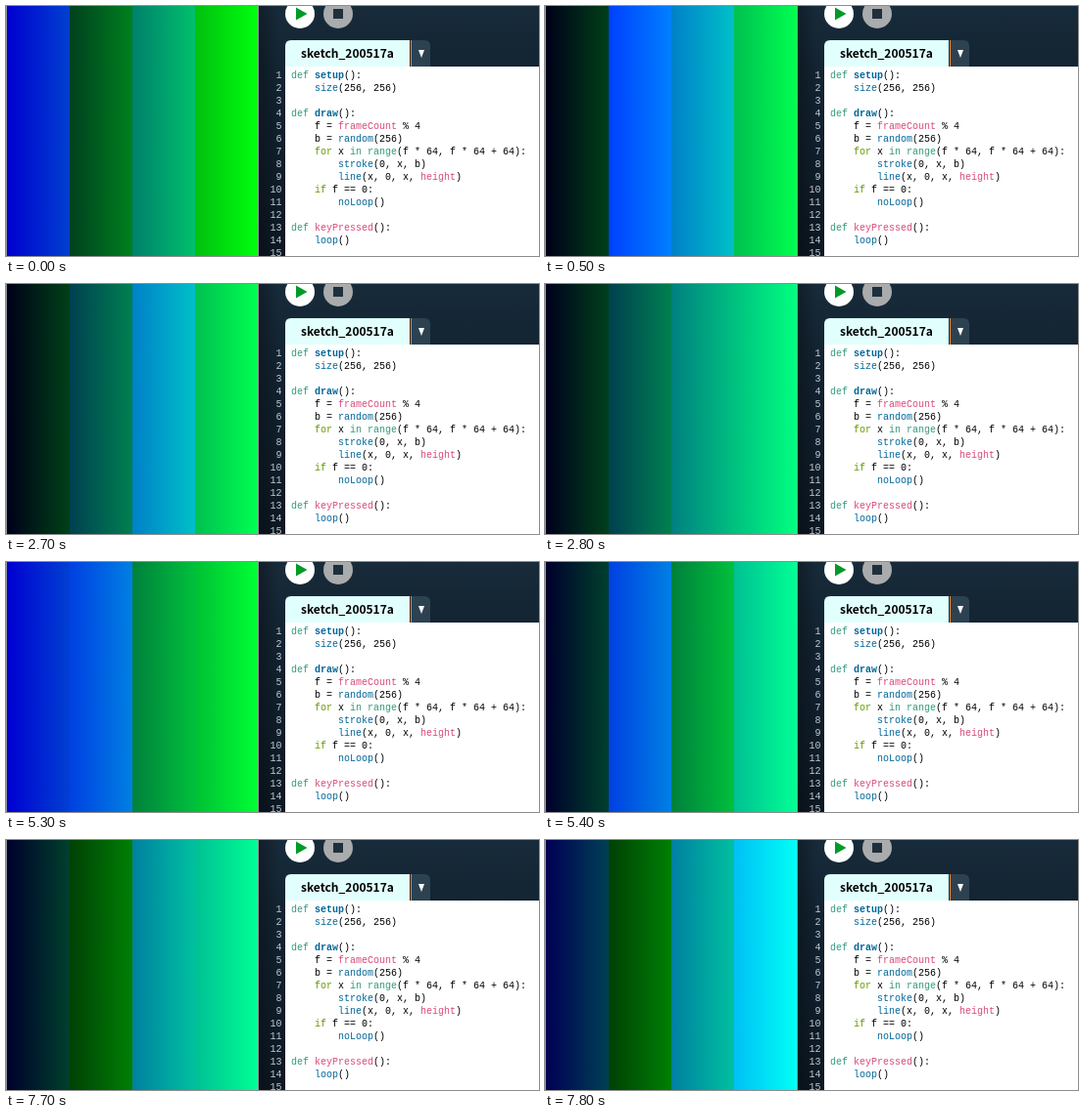
These frames come from a looping animation (544 px wide and 256 px high, 8 s). An HTML page:

```html
<!DOCTYPE html>
<html lang="en">
<head>
<meta charset="utf-8">
<title>Gradient bands sketch</title>
<style>
  html, body { margin: 0; width: 100%; height: 100%; overflow: hidden; background: #132330; }
  #stage { position: relative; width: 544px; height: 256px; overflow: hidden; background: #8c9499; }
  #stage > * { position: absolute; }
  .band { top: 0; width: 64px; height: 256px; }
  #ide { left: 0; top: 0; }
  pre {
    top: 65px; margin: 0;
    font: 10px/13px "Liberation Mono", monospace;
    color: #000;
  }
  #code { left: 291px; }
  #gutter { left: 262px; width: 19.5px; text-align: right; color: #c0cad0; }
  b, i, u, s { font-style: normal; font-weight: normal; text-decoration: none; }
  b, i { color: #006699; }
  b { font-weight: bold; }
  u { color: #33997e; }
  s { color: #d94a7a; }
  em { font-style: normal; color: #669900; }
</style>
</head>
<body>
<div id="stage">
  <svg id="ide" width="544" height="256">
    <defs>
      <linearGradient id="panel" x1="0" y1="0" x2="0" y2="1">
        <stop offset="0" stop-color="#182b3a"/>
        <stop offset=".25" stop-color="#132432"/>
        <stop offset="1" stop-color="#0c1823"/>
      </linearGradient>
      <linearGradient id="shade">
        <stop offset="0" stop-color="#000" stop-opacity=".3"/>
        <stop offset="1" stop-color="#000" stop-opacity="0"/>
      </linearGradient>
    </defs>
    <rect x="258" width="286" height="256" fill="url(#panel)"/>
    <rect x="258" width="20" height="256" fill="url(#shade)"/>
    <circle cx="300" cy="8" r="15" fill="#fff"/>
    <path d="M296 1.5l11.5 6.5-11.5 6.5z" fill="#009a28"/>
    <circle cx="339" cy="8" r="15" fill="#a9abac"/>
    <rect x="334" y="3" width="10" height="10" fill="#1f303d"/>
    <path d="M285 62V41q0-6 6-6h121v27z" fill="#e0fffd"/>
    <rect x="413" y="35" width="1" height="27" fill="#e8812b"/>
    <path d="M414 35h13q6 0 6 6v21h-19z" fill="#2d4251"/>
    <path d="M421 45h6l-3 8z" fill="#fff"/>
    <text x="301" y="53" font-family="Noto Sans CJK JP, Noto Sans CJK SC, Open Sans, sans-serif" font-size="12" font-weight="700">sketch_200517a</text>
    <rect x="285" y="62" width="259" height="194" fill="#fff"/>
  </svg>
  <pre id="gutter"></pre>
  <pre id="code"><u>def</u> <b>setup</b>():
    <i>size</i>(256, 256)

<u>def</u> <b>draw</b>():
    f = <s>frameCount</s> % 4
    b = <i>random</i>(256)
    <em>for</em> x <u>in</u> <u>range</u>(f * 64, f * 64 + 64):
        <i>stroke</i>(0, x, b)
        <i>line</i>(x, 0, x, <s>height</s>)
    <em>if</em> f == 0:
        <i>noLoop</i>()

<u>def</u> <s>keyPressed</s>():
    <i>loop</i>()</pre>
</div>
<script>
  const LOOP = 8000;
  const BAND = 64;
  // Start time in ms, then the blue level of each band.
  const states = [
    [0, 208, 30, 108, 14],
    [500, 24, 255, 200, 80],
    [2700, 24, 80, 200, 80],
    [2800, 28, 80, 128, 128],
    [4200, 210, 238, 85, 52],
    [5300, 210, 226, 60, 52],
    [5400, 44, 226, 60, 148],
    [7700, 44, 4, 160, 148],
    [7800, 84, 4, 160, 245]
  ];

  const stage = document.getElementById("stage");
  const bands = [0, 1, 2, 3].map(k => {
    const band = document.createElement("div");
    band.className = "band";
    band.style.left = 1 + k * BAND + "px";
    return stage.appendChild(band);
  });
  document.getElementById("gutter").textContent =
    Array.from({ length: 15 }, (_, n) => n + 1).join("\n");

  let shown;
  function paint(now) {
    const time = now % LOOP;
    const state = states.findLast(([start]) => start <= time);
    if (state !== shown) {
      shown = state;
      bands.forEach((band, k) => {
        const blue = state[k + 1];
        const from = k * BAND;
        const to = Math.min(255, from + BAND);
        band.style.background =
          `linear-gradient(90deg, rgb(0,${from},${blue}), rgb(0,${to},${blue}))`;
      });
    }
  }

  const begin = performance.now();
  function tick() {
    paint(performance.now() - begin);
    requestAnimationFrame(tick);
  }
  tick();
</script>
</body>
</html>
```
